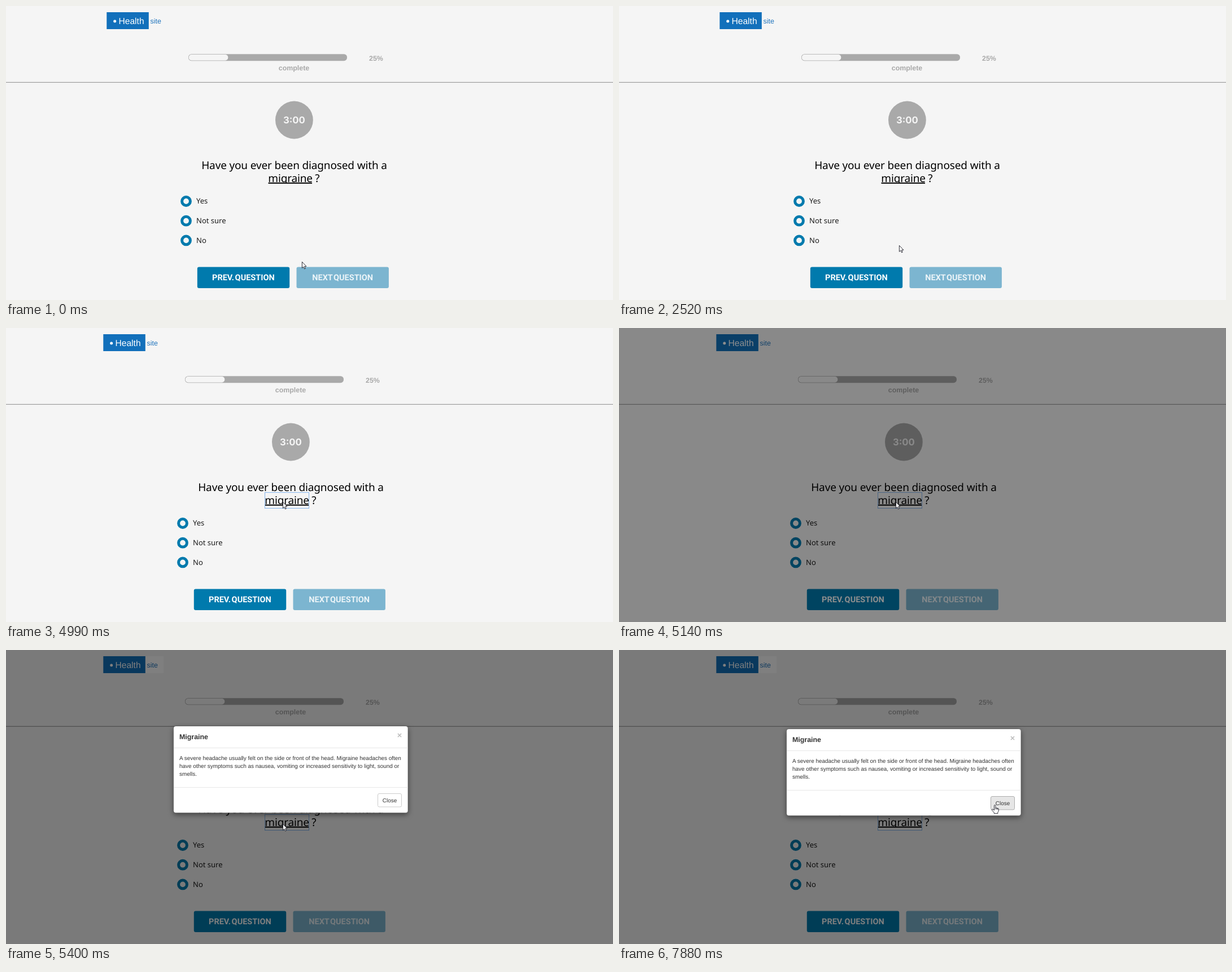
These frames come from a looping animation (1075x521 px, 8 s). An HTML page:

```html
<!DOCTYPE html>
<html lang="en">
<head>
<meta charset="utf-8">
<title>Questionnaire</title>
<style>
  html, body { margin: 0; width: 100%; height: 100%; overflow: hidden; background: #f5f5f5; }
  svg { display: block; width: 100%; height: 100%; }
  text { text-rendering: geometricPrecision; font-family: "Liberation Sans", Arial, sans-serif; }
  .mid { text-anchor: middle; }
  .grey { fill: #a9a9a9; font-weight: bold; font-size: 12.4px; }
  .question { font: 19px "Noto Sans", sans-serif; letter-spacing: -.15px; }
  .option { font: 13px "Noto Sans", sans-serif; fill: #1c1c1c; }
  .button { font: bold 14.5px Roboto, sans-serif; word-spacing: -2px; fill: #fff; text-anchor: middle; }
  .timer { font: bold 16.7px Inter, sans-serif; fill: #f5f5f5; text-anchor: middle; }
  .radio { fill: #f5f5f5; stroke: #007aad; stroke-width: 5; }
  .copy { font-size: 9.95px; fill: #333; }
  .shadow { filter: drop-shadow(0 3.5px 5px rgba(0, 0, 0, .5)); }
  .cursor { fill: #fff; stroke: #1a1a24; stroke-width: .9; stroke-linejoin: round; }
  #close { fill: #fff; stroke: #ccc; }

  /* Hard changes */
  #page, #focus, #logoBack, #backdrop, #modal, #close, #arrow, #hand { animation: 8s step-end infinite; }
  #page { animation-name: shift; }
  #focus { animation-name: focus; }
  #logoBack { animation-name: back; }
  #backdrop { animation-name: dim; }
  #modal { animation-name: drop; }
  #close { animation-name: hover; }
  #arrow { animation-name: leave; }
  #hand { animation-name: enter; }
  @keyframes shift { 0% { transform: none; } 62.3%, 100% { transform: translateX(-6px); } }
  @keyframes focus { 0% { opacity: 0; } 62.3%, 100% { opacity: 1; } }
  @keyframes back { 0% { opacity: 0; } 65.7%, 100% { opacity: 1; } }
  @keyframes dim { 0% { opacity: 0; } 64.2% { opacity: .445; } 65.7%, 100% { opacity: .5; } }
  @keyframes drop {
    0% { opacity: 0; transform: none; }
    65.7% { opacity: .2; transform: translateY(-36px); }
    67.4% { opacity: 1; transform: translateY(-5px); }
    69%, 100% { opacity: 1; transform: none; }
  }
  @keyframes hover { 0% { fill: #fff; stroke: #ccc; } 98.35%, 100% { fill: #e6e6e6; stroke: #adadad; } }
  @keyframes leave { 0% { opacity: 1; } 98.35%, 100% { opacity: 0; } }
  @keyframes enter { 0% { opacity: 0; } 98.35%, 100% { opacity: 1; } }

  /* The pointer moves about seven times a second */
  #pointer { animation: travel 8s infinite; }
  @keyframes travel {
    0%, 8.55% { transform: translate(524px, 453px); animation-timing-function: steps(10); }
    25.8% { transform: translate(499px, 426px); animation-timing-function: steps(1); }
    31.35% { transform: translate(496px, 424px); animation-timing-function: steps(3); }
    36.75% { transform: translate(474px, 365px); animation-timing-function: steps(2); }
    40% { transform: translate(479px, 343px); animation-timing-function: steps(2); }
    43.5% { transform: translate(487px, 325px); animation-timing-function: steps(4); }
    50.25%, 83.1% { transform: translate(490px, 308px); animation-timing-function: steps(2); }
    86.3% { transform: translate(495px, 302px); animation-timing-function: steps(3); }
    91.6% { transform: translate(592px, 277px); animation-timing-function: steps(4); }
    98.35%, 100% { transform: translate(664px, 274px); }
  }
</style>
</head>
<body>
<svg viewBox="0 0 1075 521">
  <rect width="1075" height="521" fill="#f5f5f5"/>
  <path d="M0 135.3H1075" stroke="#a0a0a0" stroke-width="1.2"/>

  <g id="page">
    <rect id="logoBack" x="178.3" y="11" width="107" height="30" fill="#fff"/>
    <rect x="178.3" y="11" width="74.5" height="30" fill="#1270bb"/>
    <circle cx="192.7" cy="27" r="2.5" fill="#fff"/>
    <text x="199.5" y="32" font-size="15.6" fill="#fff">Health</text>
    <text x="255.5" y="31" font-size="12.4" fill="#1f74bd">site</text>

    <rect x="323" y="85.2" width="281" height="12" rx="5.5" fill="#a9a9a9"/>
    <rect x="323.7" y="86" width="69.6" height="10.4" rx="5" fill="#f5f5f5"/>
    <text class="grey" x="643" y="96.5">25%</text>
    <text class="grey mid" x="510" y="113.7">complete</text>

    <circle cx="510.4" cy="202" r="33.4" fill="#a9a9a9"/>
    <text class="timer" x="510.4" y="208.2">3:00</text>

    <text class="question mid" x="510.5" y="288.7">Have you ever been diagnosed with a</text>
    <text class="question" x="464.3" y="311.6">migraine</text>
    <rect x="464" y="314" width="79" height="5" fill="#f5f5f5"/>
    <rect x="464.5" y="312.8" width="77.5" height="2"/>
    <text class="question" x="547.3" y="311.6">?</text>
    <rect id="focus" x="464.5" y="291.5" width="78" height="28" fill="none" stroke="#86b5ec"/>

    <circle class="radio" cx="319" cy="346" r="7.4"/>
    <circle class="radio" cx="319" cy="380.7" r="7.4"/>
    <circle class="radio" cx="319" cy="415.4" r="7.4"/>
    <text class="option" x="337" y="350.4">Yes</text>
    <text class="option" x="337" y="385">Not sure</text>
    <text class="option" x="337" y="419.7">No</text>

    <rect x="338.8" y="462.5" width="163.4" height="37.5" rx="3" fill="#007aad"/>
    <rect x="514.5" y="462.5" width="163.4" height="37.5" rx="3" fill="#7cb5d0"/>
    <text class="button" x="420.4" y="485.6">PREV. QUESTION</text>
    <text class="button" x="596.2" y="485.6" opacity=".85">NEXT QUESTION</text>
  </g>

  <rect id="backdrop" width="1075" height="521"/>

  <g id="modal">
    <rect class="shadow" x="296.8" y="140" width="415" height="153.6" rx="4" fill="#fff" stroke="#000" stroke-opacity=".25" stroke-width=".7"/>
    <path d="M297 178.5H711.5M297 248.5H711.5" stroke="#e7e7e7"/>
    <text x="307" y="163" font-size="12.4" font-weight="bold" fill="#333">Migraine</text>
    <text class="mid" x="697" y="161.3" font-size="14.5" font-weight="bold" fill="#bdbdbd">×</text>
    <text class="copy" x="307" y="200">A severe headache usually felt on the side or front of the head. Migraine headaches often</text>
    <text class="copy" x="307" y="214">have other symptoms such as nausea, vomiting or increased sensitivity to light, sound or</text>
    <text class="copy" x="307" y="228">smells.</text>
    <rect id="close" x="658.5" y="259.5" width="42" height="23.5" rx="2.5"/>
    <text class="copy mid" x="679.5" y="274.8">Close</text>
  </g>

  <g id="pointer">
    <path id="arrow" class="cursor" d="M.4 .4V11.4L2.8 9.1 4.5 12.9 6.2 12.2 4.6 8.4H7.9Z"/>
    <path id="hand" class="cursor" d="M.5 1.8a1.2 1.2 0 0 1 2.4 0V5.7L7.5 6.7Q8.7 7.1 8.5 8.5L7.9 12.3 6.8 13.7V15.8H.3V14.1L-3.5 9.9Q-4.1 8.1-2.3 8.1L.5 9.9ZM2.9 5.7V8.5M5.1 6.2V8.7M6.9 6.7V9.1"/>
  </g>
</svg>
</body>
</html>
```
